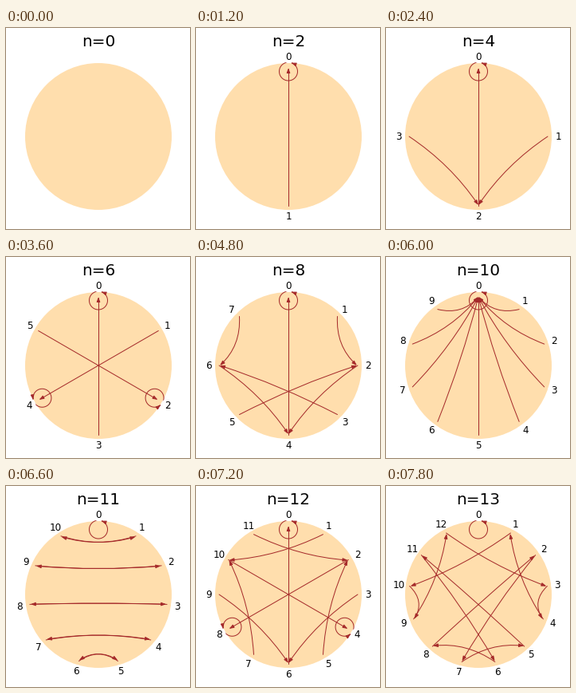
A matplotlib script for the animation above (8000 ms loop, 231 by 252 pixels).

```python
import numpy as np
import matplotlib.pyplot as plt
from matplotlib.animation import FuncAnimation
from matplotlib.patches import Circle, FancyArrowPatch
from matplotlib.path import Path

W, H = 231, 252
DPI = 64
PX = 72 / DPI                     # points per pixel
CENTER = np.array([116.0, 136.0])
DISC, EDGE, LABEL = 92, 87, 100   # radii in pixels
LOOP_CENTER, LOOP_R = 81.5, 11.5
PULL = 0.8                        # control point, as a share of the chord's middle
STEP, TICK = 3, 200               # ticks per n, ms per tick
TICKS = 40

fig = plt.figure(figsize=(W / DPI, H / DPI), dpi=DPI, facecolor="white")
ax = fig.add_axes([0, 0, 1, 1])
plt.rcParams["font.family"] = "DejaVu Sans"


def polar(angle, radius):
    """Offset for a clockwise angle measured from the top."""
    return radius * np.array([np.sin(angle), -np.cos(angle)])


def arrow(path):
    ax.add_patch(FancyArrowPatch(
        path=path, arrowstyle="-|>,head_length=5,head_width=1.8",
        mutation_scale=PX, lw=PX, color="brown", zorder=2))


def chord(a, b):
    start, end = polar(a, EDGE), polar(b, EDGE - 1)
    mid = (polar(a, EDGE) + polar(b, EDGE)) / 2
    if np.hypot(*mid) < 1e-6:
        arrow(Path([CENTER + start, CENTER + end]))
    else:
        arrow(Path([CENTER + start, CENTER + PULL * mid, CENTER + end],
                   [Path.MOVETO, Path.CURVE3, Path.CURVE3]))


def loop(a):
    hub = CENTER + polar(a, LOOP_CENTER)
    turn = np.radians(np.linspace(0, -342, 80))
    arrow(Path([hub + polar(a + t, LOOP_R) for t in turn]))


def draw(tick):
    n = tick // STEP
    ax.clear()
    ax.set_xlim(0, W)
    ax.set_ylim(H, 0)
    ax.axis("off")
    ax.add_patch(Circle(CENTER, DISC, fc="navajowhite", ec="none", zorder=1))
    ax.text(CENTER[0], 23, f"n={n}", size=20 * PX, ha="center", va="baseline")

    for k in range(n):
        a = 2 * np.pi * k / n
        goal = 10 * k % n
        if goal == k:
            loop(a)
        else:
            chord(a, 2 * np.pi * goal / n)
        x, y = CENTER + polar(a, LABEL)
        ax.add_patch(Circle((x, y), 8, fc="white", ec="none", zorder=3))
        ax.text(x, y + 4.3, str(k), size=12 * PX, ha="center",
                va="baseline", zorder=4)
    return []


anim = FuncAnimation(fig, draw, frames=TICKS, init_func=lambda: draw(0),
                     interval=TICK, repeat=True, repeat_delay=0, blit=False)
plt.show()
```
